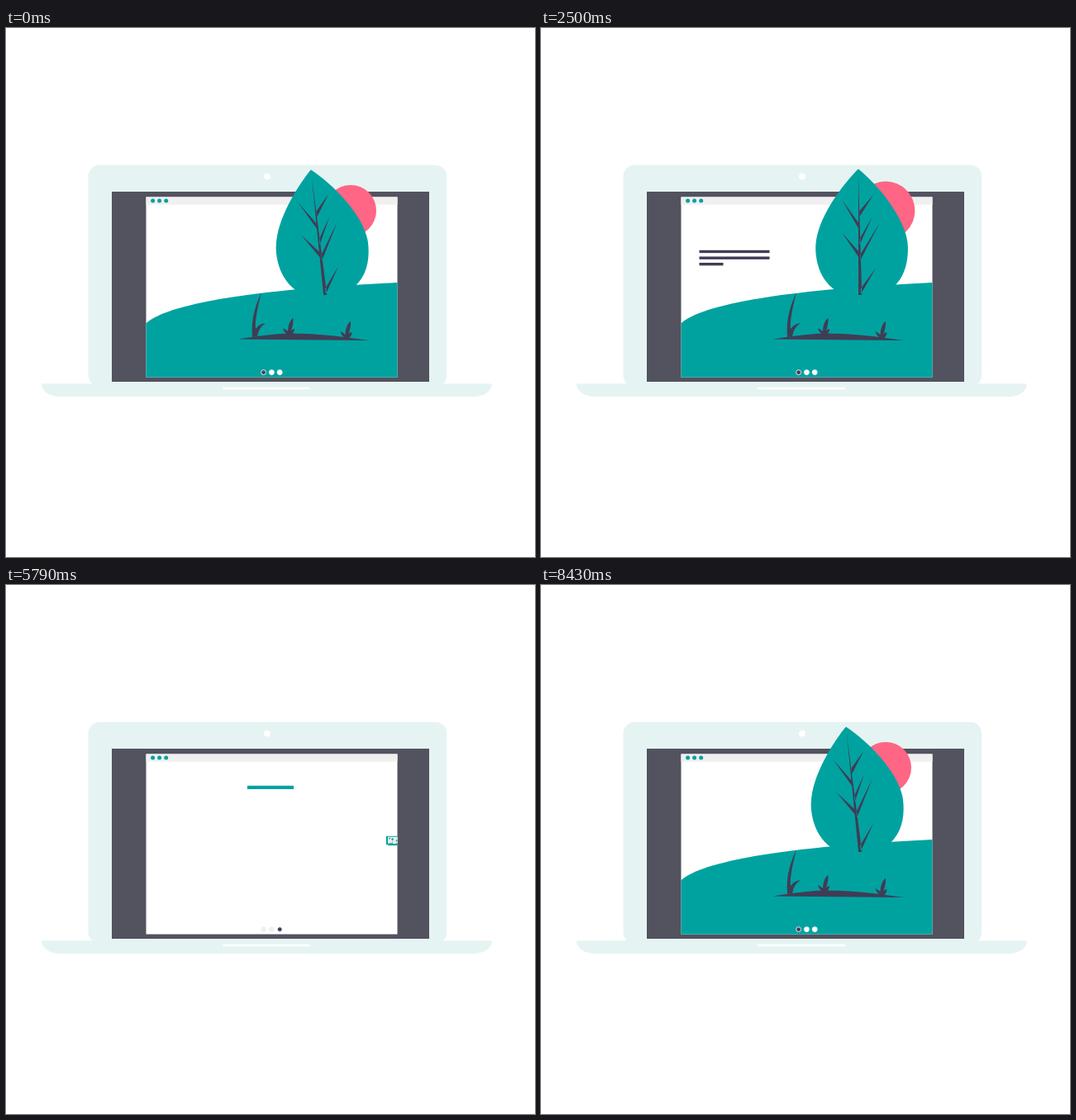
Animation, 640 px wide and 640 px high, one loop 8.5 s. Source, as an HTML page:

```html
<!DOCTYPE html>
<html lang="en">
<head>
<meta charset="utf-8">
<title>Laptop slides</title>
<style>
  html, body { margin: 0; width: 100%; height: 100%; overflow: hidden; background: #fff; }
  svg { display: block; width: 100vw; height: 100vh; }
  .teal { fill: #00a2a0; }
  .dark { fill: #3f3d56; }
  .pale { fill: #e5f4f3; }
  .white { fill: #fff; }
  .gray { fill: #f0f0f0; }
</style>
</head>
<body>
<svg viewBox="0 0 640 640">
  <defs>
    <clipPath id="page"><rect x="169.5" y="204.5" width="304.3" height="218.3"/></clipPath>
    <clipPath id="photo"><rect x="319.5" y="278.3" width="118.2" height="68.5"/></clipPath>
  </defs>

  <rect class="pale" x="99.5" y="165.7" width="433.8" height="268.3" rx="14"/>
  <path class="pale" d="M45 430.2H586Q588 430.2 588 432C586 441 577 446 565 446H66C54 446 45 441 42.7 432Q42.7 430.2 45 430.2Z"/>
  <rect class="white" x="262" y="434.7" width="106" height="2.6" rx="1.3"/>
  <circle class="white" cx="316" cy="179.6" r="3.9"/>
  <rect x="128" y="198" width="384" height="230" fill="#52535f"/>
  <rect class="white" x="169.5" y="204.5" width="304" height="218"/>
  <rect class="gray" x="169.5" y="204.5" width="304" height="9.3"/>
  <g class="teal">
    <circle cx="177.6" cy="208.9" r="2.5"/><circle cx="185.6" cy="208.9" r="2.5"/><circle cx="193.7" cy="208.9" r="2.5"/>
  </g>

  <g id="slide0">
    <path class="teal" d="M169.5 357.3C188 340 260 318 473.5 308V422.6H169.5Z"/>
    <circle id="sun" cx="417" cy="221" r="31" fill="#ff6584"/>
    <g id="tree">
      <path class="teal" d="M386 170.5C366 190 333 232 333 266C333 290 343 311 362 320H418C437 309 444.7 290 444.7 266C444.7 235 412 192 386 170.5Z"/>
      <path id="twigs" class="dark"/>
    </g>
    <g class="dark">
      <path d="M281 376.5C300 373 330 369.5 345 369.5C380 369.5 410 374 439 378Z"/>
      <path d="M298 374C296 350 303 333 309 320C304 340 301 354 302 364Q306 358 314 357Q306 362 304 373Z"/>
      <path id="tuft" d="M341 371Q336 368 335 363Q339 365 341 367Q341 356 347.5 350.5Q348 358 345 366Q347 364 349 364Q349 368 345 372Z"/>
      <use href="#tuft" x="69.5" y="4"/>
    </g>
    <g id="text0" class="dark"></g>
  </g>

  <g id="slide1" clip-path="url(#page)">
    <path class="dark" d="M169.5 357.5L473.5 308V422.5H169.5Z"/>
    <g id="rings"></g>
    <g id="leaf">
      <path class="white" d="M459 394C468 397 475 408 473.8 422.7C463 417 457 406 459 394Z"/>
      <path class="teal" d="M448 404C460 402 472 410 473.8 422.7C460 422 449 414 448 404Z"/>
    </g>
    <g id="text1" class="dark"></g>
  </g>

  <g id="slide2" clip-path="url(#page)">
    <g id="text2" class="teal"></g>
    <g id="picture">
      <rect class="teal" x="305.5" y="272" width="118.3" height="68"/>
      <rect x="319.5" y="278.3" width="118.2" height="68.5" fill="#ececec"/>
      <path d="M379 286.6H424" stroke="#f6f6f6" stroke-width=".8"/>
      <g clip-path="url(#photo)">
        <circle class="teal" cx="333.2" cy="290.6" r="6.2"/>
        <g id="palms"></g>
        <circle id="nut" class="teal" r="2.4"/>
        <path class="teal" d="M319.5 334C333 326 355 326 372 336L355 347H319.5Z"/>
        <path class="teal" d="M355 346.7C375 325 410 320 437.7 345V347H355Z" stroke="#3f3d56" stroke-width=".5"/>
      </g>
    </g>
  </g>
  <g id="dots"></g>
</svg>
<script>
const LOOP = 8500, STEP = LOOP / 119;
const TEAL = '#00a2a0', DARK = '#3f3d56';
const $ = id => document.getElementById(id);
const clamp = v => Math.max(0, Math.min(1, v));
const ramp = (t, from, to) => clamp((t - from) / (to - from));
const easeInOut = p => p < .5 ? 2 * p * p : 1 - 2 * (1 - p) ** 2;
const wave = (t, phase = 0) => (1 - Math.cos((t / 740 + phase) * 2 * Math.PI)) / 2;

function set(el, attrs) {
  for (const k in attrs) el.setAttribute(k, attrs[k]);
  return el;
}
function add(parent, tag, attrs) {
  const el = document.createElementNS('http://www.w3.org/2000/svg', tag);
  parent.append(set(el, attrs));
  return el;
}
const addBars = (id, ys, x, height) =>
  ys.map(y => add($(id), 'rect', { x, y, height, width: 0 }));

// Trunk and twigs: tip x, tip y, root x, root y
const twigs = [[366, 208, 385.5, 241], [404, 202, 387, 226], [402, 229, 386.5, 260],
  [365, 247, 385.5, 276], [411, 236, 387, 279], [406, 290, 387, 320]];
$('twigs').setAttribute('d', 'M386 178L388.2 323H384Z' +
  twigs.map(([x, y, u, v]) => `M${x} ${y}L${u} ${v - 5}V${v + 2}Z`).join(''));

// Palms: crown x, crown y, radius, foot x, foot y
const palms = [[356, 296.5, 12.2, 353, 331], [389.8, 307, 9.2, 391.8, 331], [416, 315, 5.8, 417.5, 334]];
for (const [x, y, r, fx, fy] of palms) {
  const w = r / 9;
  add($('palms'), 'path', {
    class: 'teal', d: `M${x - w / 2} ${y}L${fx - w} ${fy}H${fx + w}L${x + w / 2} ${y}Z`
  });
  const points = Array.from({ length: 26 }, (_, i) => {
    const a = i * Math.PI / 13 - 1.45;
    const d = i % 2 ? r * .5 : r * (.93 + .08 * Math.sin(i * 2.3));
    return `${x + d * Math.cos(a)},${y + d * Math.sin(a)}`;
  });
  add($('palms'), 'polygon', { class: 'teal', points: points.join(' ') });
}

// Rings: centre, size, bar colour, wave phase
const rings = [[401.5, 262, 1, null, 0], [234, 311.5, 1.01, DARK, 0], [405, 400.2, .98, '#fff', -.08]]
  .map(([x, y, size, bar, shift]) => {
    const g = add($('rings'), 'g', { transform: `translate(${x} ${y})` });
    if (bar) add(g, 'rect', { x: -14.6, y: -3.3, width: 29.2, height: 6.6, fill: bar });
    const circles = [.25, .5, bar ? 1 : .8].map(o => add(g, 'circle', { fill: TEAL, 'fill-opacity': o }));
    return { circles, size, shift };
  });

const dots = [0, 1, 2].map(i => add($('dots'), 'circle', { cx: 311.6 + i * 9.8, cy: 416.6, r: 3 }));
const thinRows = [268.8, 276.5, 284];
const text0 = addBars('text0', thinRows, 191.5, 3.4);
const text1 = addBars('text1', thinRows, 191.5, 3.4);
const text2 = addBars('text2', [242.8, 251, 259.4, 267.8, 276.1, 284.6], 192, 4.2);

function type(bars, elapsed) {
  let left = Math.max(0, elapsed * .1645);
  [85, 85, 29].forEach((full, i) => {
    bars[i].setAttribute('width', Math.min(full, left));
    left = Math.max(0, left - full);
  });
}

function drawTree(t) {
  const sway = t > 8000 ? 0 : wave(t);
  $('tree').setAttribute('transform', `rotate(${-6.5 + 6.6 * sway} 386.5 322)`);
  $('sun').setAttribute('r', 31 + 5.1 * sway);
  type(text0, t > 8000 ? 0 : t);
}

function drawRings(t) {
  for (const { circles, size, shift } of rings) {
    const beat = wave(t - 3214, .5 + shift);
    [21.4 * (.82 + .18 * beat), 14.5 * (.92 + .08 * beat), 9.5]
      .forEach((r, i) => circles[i].setAttribute('r', r * size));
  }
  const lean = 5 * Math.sin((t - 3214) / 740 * 2 * Math.PI);
  $('leaf').setAttribute('transform', `rotate(${lean} 473.8 422.7)`);
  type(text1, t - 2892);
}

function drawPicture(t) {
  const s = easeInOut(ramp(t, 5650, 6140));
  $('picture').setAttribute('transform', `translate(487.8 309.5) scale(${s}) translate(-487.8 -309.5)`);

  // The heading opens from the middle, then moves to the left column
  const w = 100 * ramp(t, 5640, 5900);
  const mid = 320 - 78 * easeInOut(ramp(t, 5860, 6080));
  set(text2[0], { x: mid - w / 2, width: w });
  text2[1].setAttribute('width', 100 * ramp(t, 5990, 6140));
  text2[2].setAttribute('width', 100 * ramp(t, 6170, 6500));
  const back = 100 * ramp(t, 6531, 6930);
  set(text2[3], { x: 292 - back, width: back });
  text2[4].setAttribute('width', 100 * ramp(t, 6627, 6930));
  text2[5].setAttribute('width', 48 * ramp(t, 6643, 6930));

  const fall = ramp(t, 7060, 7430);
  set($('nut'), {
    cx: 361.7 + 5 * fall, cy: 314 + 26 * fall * fall,
    opacity: fall > 0 && fall < 1 ? 1 : 0
  });
}

function drawDots(active) {
  dots.forEach((dot, i) => {
    const on = i === active;
    const idle = active === 2 ? '#f0f0f0' : '#fff';
    set(dot, {
      fill: on ? DARK : idle,
      stroke: on ? '#fff' : idle,
      'stroke-width': on ? .9 : .5,
      r: on ? 2.9 : 3.1
    });
  });
}

function draw(t) {
  const a = ramp(t, 2550, 2860), b = ramp(t, 5270, 5580), c = ramp(t, 8020, 8420);
  const alpha = [1 - a + c, a - b, b - c];
  alpha.forEach((o, i) => {
    set($('slide' + i), { opacity: o, visibility: o > 0 ? 'visible' : 'hidden' });
  });
  drawTree(t);
  drawRings(t);
  drawPicture(t);
  drawDots(alpha.indexOf(Math.max(...alpha)));
}

const start = performance.now();
function tick() {
  const t = (performance.now() - start) % LOOP;
  draw(Math.floor(t / STEP + .15) % 119 * STEP);
  requestAnimationFrame(tick);
}
tick();
</script>
</body>
</html>
```
